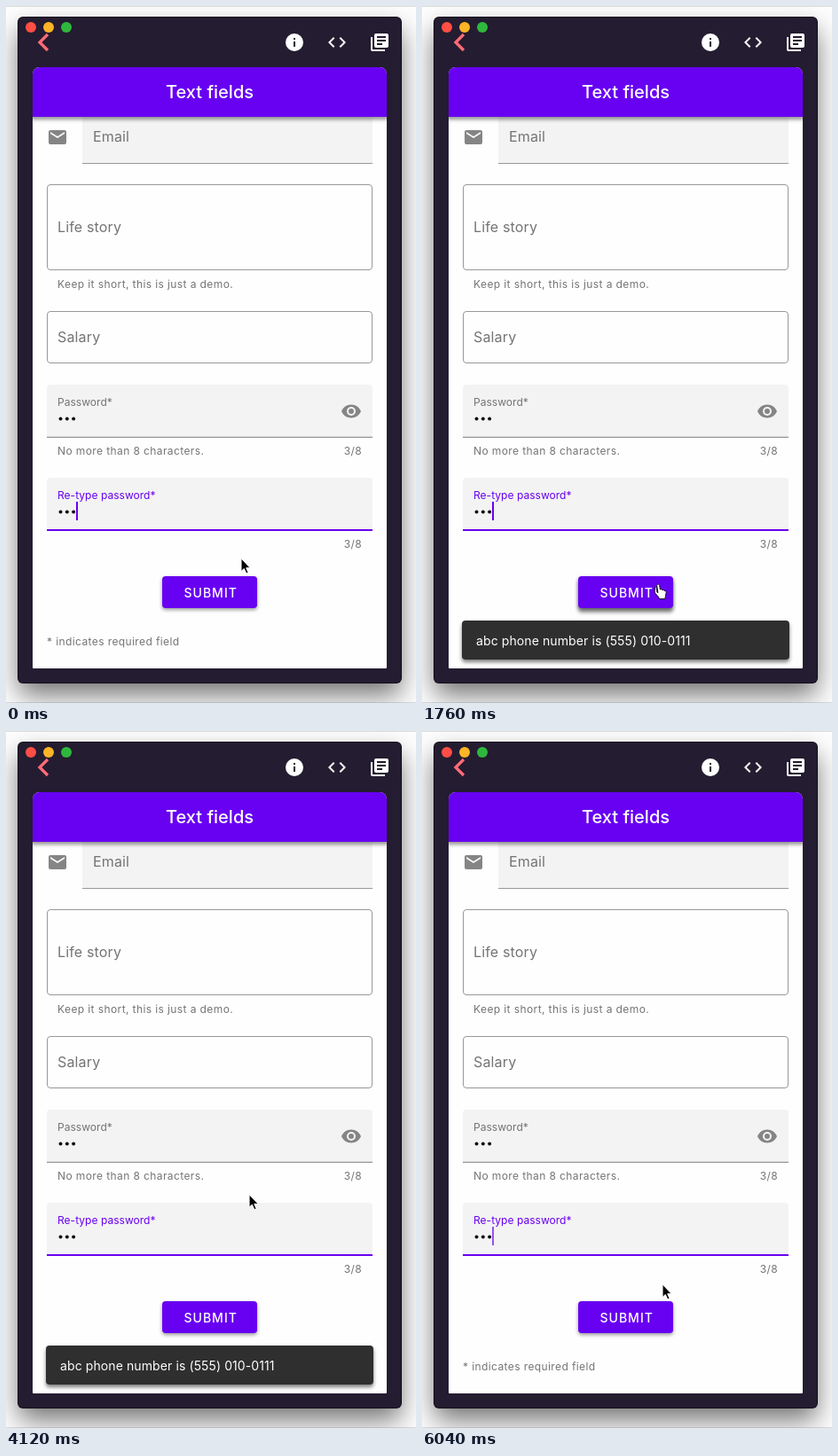
An HTML page for the animation above (6.08 s loop, 462 by 786 pixels).

```html
<!DOCTYPE html>
<html lang="en">
<head>
<meta charset="utf-8">
<title>Text fields</title>
<style>
  html, body { margin: 0; width: 100%; height: 100%; overflow: hidden; background: #fff; }
  #stage { position: relative; width: 462px; height: 786px; overflow: hidden; background: #fefefe;
    box-shadow: inset 0 1px #ddd, inset 0 -1px #ddd; }
  #window { position: absolute; left: 14px; top: 13px; width: 431px; height: 750px; border-radius: 5px;
    background: #241c30; box-shadow: 0 0 0 1px #15101c, 0 14px 30px rgba(0,0,0,.55); }
  svg { position: absolute; inset: 0; }
  text { font-family: Inter, Roboto, sans-serif; fill: #747474; }
  .label { font-size: 16px; letter-spacing: .15px; }
  .small { font-size: 12px; letter-spacing: .4px; }
  .float { font-size: 12px; letter-spacing: .03px; }
  .end { text-anchor: end; }
  .title { font-size: 20px; font-weight: 500; fill: #fff; text-anchor: middle; }
  .button { font-size: 14px; font-weight: 500; letter-spacing: 1px; fill: #fff; }
  .snack { font-size: 14px; letter-spacing: .1px; fill: #fff; }
  .purple { fill: #6800f2; }
  .filled { fill: #f3f3f3; }
  .line { fill: #989898; }
  .outline { fill: none; stroke: #989898; }
  .icon { fill: #858585; }
  .white { fill: #fff; }
</style>
</head>
<body>
<div id="stage">
  <div id="window"></div>
  <svg width="462" height="786" viewBox="0 0 462 786">
    <defs>
      <clipPath id="page"><path d="M30 77a8 8 0 0 1 8-8H421a8 8 0 0 1 8 8V746a1 1 0 0 1-1 1H31a1 1 0 0 1-1-1z"/></clipPath>
      <filter id="shade" x="-20%" y="-60%" width="140%" height="240%"><feGaussianBlur stdDeviation="2"/></filter>
      <g id="dots" fill="#111"><circle cx="61.5" r="2"/><circle cx="68.8" r="2"/><circle cx="76.1" r="2"/></g>
    </defs>

    <circle cx="28" cy="24" r="6" fill="#ff4e45"/>
    <circle cx="48" cy="24" r="6" fill="#fdb427"/>
    <circle cx="68" cy="24" r="6" fill="#2db83d"/>
    <path d="M47 32l-9 9 9 9" fill="none" stroke="#ff6b78" stroke-width="3.3"/>
    <path class="white" transform="translate(313 29)" d="M12 2a10 10 0 1 0 0 20 10 10 0 0 0 0-20zm1 15h-2v-6h2zm0-8h-2V7h2z"/>
    <path class="white" transform="translate(361 29)" d="M9.4 16.6 4.8 12l4.6-4.6L8 6l-6 6 6 6zm5.2 0 4.6-4.6-4.6-4.6L16 6l6 6-6 6z"/>
    <path class="white" transform="translate(409 29)" d="M4 6H2v14a2 2 0 0 0 2 2h14v-2H4zm16-4H8a2 2 0 0 0-2 2v12a2 2 0 0 0 2 2h12a2 2 0 0 0 2-2V4a2 2 0 0 0-2-2zm-1 9H9V9h10zm-4 4H9v-2h6zm4-8H9V5h10z"/>

    <g clip-path="url(#page)">
      <rect x="30" y="69" width="399" height="678" fill="#fefefe"/>

      <path class="icon" transform="translate(46 136)" d="M20 4H4a2 2 0 0 0-2 2v12a2 2 0 0 0 2 2h16a2 2 0 0 0 2-2V6a2 2 0 0 0-2-2zm0 4-8 5-8-5V6l8 5 8-5z"/>
      <rect class="filled" x="86" y="118" width="327" height="60"/>
      <rect class="line" x="86" y="177" width="327" height="1"/>
      <text class="label" x="98" y="153">Email</text>

      <rect class="outline" x="46.5" y="201.5" width="366" height="96" rx="3.5"/>
      <text class="label" x="58" y="255">Life story</text>
      <text class="small" x="58" y="318">Keep it short, this is just a demo.</text>

      <rect class="outline" x="46.5" y="344.5" width="366" height="58" rx="3.5"/>
      <text class="label" x="58" y="379">Salary</text>

      <path class="filled" d="M46 487V431a4 4 0 0 1 4-4H409a4 4 0 0 1 4 4V487z"/>
      <path id="fieldHover" fill="#eaeaea" d="M46 487V431a4 4 0 0 1 4-4H409a4 4 0 0 1 4 4V487z"/>
      <rect class="line" x="46" y="485.7" width="367" height="1.3"/>
      <text class="float" x="58" y="451">Password*</text>
      <use href="#dots" y="465.5"/>
      <path class="icon" transform="translate(377 445)" d="M12 4.5C7 4.5 2.7 7.6 1 12c1.700 4.400 6 7.500 11 7.500s9.300-3.100 11-7.500c-1.700-4.400-6-7.500-11-7.500zM12 17a5 5 0 1 1 0-10 5 5 0 0 1 0 10zm0-8a3 3 0 1 0 0 6 3 3 0 0 0 0-6z"/>
      <text class="small" x="58" y="506">No more than 8 characters.</text>
      <text class="small end" x="401" y="506">3/8</text>

      <path class="filled" d="M46 592V536a4 4 0 0 1 4-4H409a4 4 0 0 1 4 4V592z"/>
      <rect class="purple" x="46" y="590" width="367" height="2"/>
      <text class="float purple" x="58" y="556">Re-type password*</text>
      <use href="#dots" y="570.5"/>
      <rect id="caret" class="purple" x="79" y="559" width="2" height="21"/>
      <text class="small end" x="401" y="611">3/8</text>

      <rect x="176" y="645" width="107" height="36" rx="4" opacity=".4" filter="url(#shade)"/>
      <rect id="lift" x="176" y="647" width="107" height="37" rx="4" filter="url(#shade)"/>
      <rect class="purple" x="176" y="643" width="107" height="36" rx="4"/>
      <text class="button" x="200.500" y="667">SUBMIT</text>
      <text class="small" x="46" y="721">* indicates required field</text>

      <g id="snackbar">
        <rect x="45" y="696" width="369" height="44" rx="4" opacity=".5" filter="url(#shade)"/>
        <rect x="45" y="693" width="369" height="44" rx="4" fill="#2f2f2f"/>
        <text class="snack" x="61" y="721">abc phone number is (555) 010-0111</text>
      </g>

      <rect x="28" y="72" width="403" height="56" opacity=".42" filter="url(#shade)"/>
      <rect class="purple" x="30" y="69" width="399" height="56"/>
      <text class="title" x="229.500" y="104">Text fields</text>
    </g>

    <g id="pointer">
      <path id="arrow" d="M0 0V14.500l3.300-3 2.500 5.600 2.300-1-2.400-5.400h4.500z" stroke="#fff" stroke-linejoin="round"/>
      <path id="hand" fill="#fff" stroke="#111" stroke-linejoin="round"
        d="M-1.500 1C-1.500-1 1.300-1 1.500 1L2.200 5.500C3 4.500 4.500 5 4.600 6.200 5.500 5.300 6.900 5.900 7 7 8.200 6.400 9.200 7.300 9 8.700L8.200 13 7.700 16H1.300L.5 14-3.500 9.500C-4.600 8-3-6.600-1.300 8.500L-.3 9z"/>
      <g id="beam" fill="none">
        <path d="M-3-7.500H-1.500L0-6 1.500-7.500H3M0-6V6M-3 7.500H-1.500L0 6 1.500 7.500H3M-1.500 2H1.500" stroke="#fff" stroke-width="2.600"/>
        <path d="M-3-7.500H-1.500L0-6 1.500-7.500H3M0-6V6M-3 7.500H-1.500L0 6 1.500 7.500H3M-1.500 2H1.500" stroke="#111" stroke-width="1.200"/>
      </g>
    </g>
  </svg>
</div>
<script>
  const LOOP = 6080, STEP = 40;
  const el = id => document.getElementById(id);
  const [pointer, caret, snackbar, lift, fieldHover] =
    ['pointer', 'caret', 'snackbar', 'lift', 'fieldHover'].map(el);
  const shapes = { arrow: el('arrow'), hand: el('hand'), beam: el('beam') };

  // Pointer stops: time, x, y
  const path = [
    [0, 265, 623], [80, 265, 623], [560, 266, 661], [1640, 266, 661],
    [2440, 269, 523], [2600, 269, 523], [3120, 271, 455], [3480, 271, 455],
    [4080, 274, 522], [4640, 277, 566], [5400, 277, 566], [5960, 271, 624], [LOOP, 271, 624]
  ];

  const clamp = v => Math.max(0, Math.min(1, v));
  const ramp = (t, from, to) => clamp((t - from) / (to - from));
  const smooth = v => v * v * (3 - 2 * v);

  function pointerAt(t) {
    const i = path.findIndex(p => p[0] > t);
    const [t0, x0, y0] = path[i - 1], [t1, x1, y1] = path[i];
    const k = smooth(ramp(t, t0, t1));
    return [x0 + (x1 - x0) * k, y0 + (y1 - y0) * k];
  }

  function shapeAt(y) {
    if (y >= 643 && y < 679) return 'hand';
    return (y >= 427 && y < 487) || (y >= 532 && y < 592) ? 'beam' : 'arrow';
  }

  function caretAlpha(t) {
    const phase = t % 1000;
    return phase < 460 ? 1 - ramp(phase, 0, 120) : ramp(phase, 460, 660);
  }

  function draw(t) {
    const [x, y] = pointerAt(t), shape = shapeAt(y);
    pointer.setAttribute('transform', `translate(${x} ${y})`);
    for (const name in shapes) shapes[name].style.display = name === shape ? '' : 'none';
    caret.style.opacity = caretAlpha(t);
    snackbar.style.opacity = smooth(ramp(t, 860, 1000)) * (1 - smooth(ramp(t, 5030, 5110)));
    lift.style.opacity = .4 * ramp(y, 643, 653);
    fieldHover.style.opacity = ramp(y, 487, 475);
  }

  const start = performance.now();
  function tick() {
    const t = (performance.now() - start) % LOOP;
    draw(Math.floor(t / STEP) * STEP);
    requestAnimationFrame(tick);
  }
  draw(0);
  requestAnimationFrame(tick);
</script>
</body>
</html>
```
